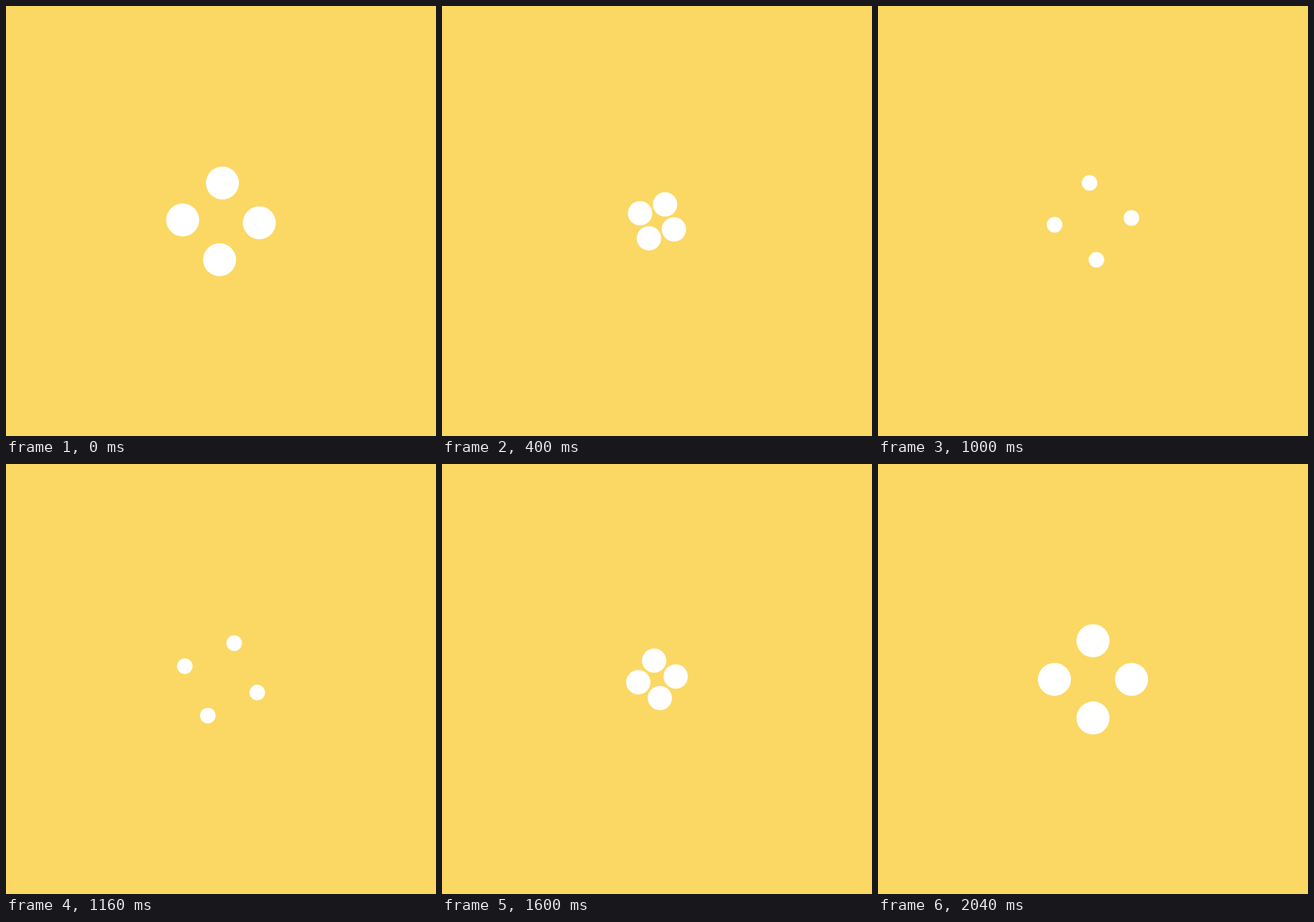
An HTML page with a canvas for the animation above (2.2 s loop, 600 by 600 pixels).

```html
<!DOCTYPE html>
<html lang="en">
<head>
<meta charset="utf-8">
<title>Four dots</title>
<style>
  html, body { margin: 0; width: 100%; height: 100%; overflow: hidden; background: #fbd864; }
  canvas { display: block; width: 100vmin; height: 100vmin; }
</style>
</head>
<body>
<canvas id="stage" width="600" height="600"></canvas>
<script>
const ctx = document.getElementById('stage').getContext('2d');
const LOOP = 2200, STEP = 40, CX = 300, CY = 300.5;
const BEGIN = -26, END = 1991;      // the loop opens just after the motion began
const GATHER = 400, SPREAD = 750;   // dots closest, then small and apart
const RETURN = 1330, REGATHER = 1615;

const clamp = p => Math.min(1, Math.max(0, p));

// Smooth 0 to 1 between two times
function ramp(t, from, to) {
  const p = clamp((t - from) / (to - from));
  return p * p * (3 - 2 * p);
}

// Rises from a to b, falls from b to c
const bump = (t, a, b, c) => ramp(t, a, b) - ramp(t, b, c);

// CSS "ease": cubic-bezier(.25, .1, .25, 1)
function ease(p) {
  let lo = 0, hi = 1;
  for (let i = 0; i < 24; i++) {
    const s = (lo + hi) / 2;
    if (0.75 * s * (1 - s) + s ** 3 < p) lo = s; else hi = s;
  }
  return 0.3 * lo * (1 - lo) ** 2 + 3 * lo * lo * (1 - lo) + lo ** 3;
}

function pose(t) {
  const turn = 360 * ease(clamp((t - BEGIN) / (END - BEGIN)));
  const sway = 27.8 * bump(t, 470, 1060, 1650);
  const dip = bump(t, BEGIN, GATHER, SPREAD) + bump(t, RETURN, REGATHER, END + 40);
  const shrink = ramp(t, BEGIN, GATHER) + ramp(t, GATHER, SPREAD)
               - ramp(t, RETURN, REGATHER) - ramp(t, REGATHER, END + 40);
  return {
    angle: (turn - sway) * Math.PI / 180,
    dist: 53.8 - 27.6 * dip,
    radius: 23.1 - 6.1 * shrink
  };
}

function draw(t) {
  const { angle, dist, radius } = pose(t);
  ctx.fillStyle = '#fbd864';
  ctx.fillRect(0, 0, 600, 600);
  ctx.fillStyle = '#fff';
  for (let k = 0; k < 4; k++) {
    const a = angle + k * Math.PI / 2;
    ctx.beginPath();
    ctx.arc(CX + dist * Math.sin(a), CY - dist * Math.cos(a), radius, 0, Math.PI * 2);
    ctx.fill();
  }
}

const start = performance.now();
function tick() {
  const t = (performance.now() - start) % LOOP;
  draw(Math.floor(t / STEP) * STEP);
  requestAnimationFrame(tick);
}
tick();
</script>
</body>
</html>
```
